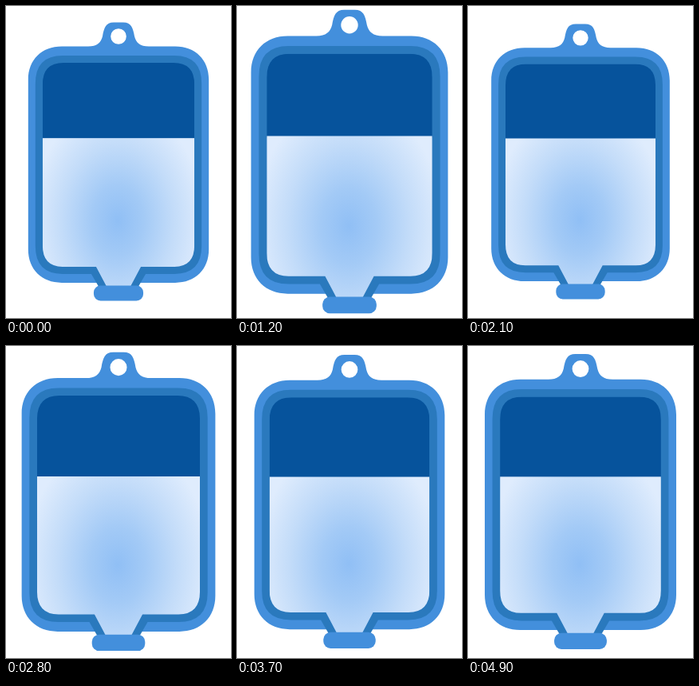
Animation, 282 px wide and 390 px high, one loop 5 s. Source, as an HTML page:

```html
<!DOCTYPE html>
<html lang="en">
<head>
<meta charset="utf-8">
<title>Pulsing fluid bag</title>
<style>
  html, body { margin: 0; width: 100%; height: 100%; overflow: hidden; background: #fff; }
  svg { display: block; width: 100vw; height: 100vh; }
</style>
</head>
<body>
<svg viewBox="0 0 282 390">
  <defs>
    <radialGradient id="fluid" gradientUnits="userSpaceOnUse" cx="0" cy="0" r="1"
      gradientTransform="translate(140 268) scale(108 146)">
      <stop offset="0" stop-color="#90bff5"/>
      <stop offset=".3" stop-color="#a3caf6"/>
      <stop offset=".65" stop-color="#c3dcf9"/>
      <stop offset="1" stop-color="#dfecfd"/>
    </radialGradient>
    <clipPath id="inside">
      <path d="M72 71H210Q236 71 236 98V299Q236 325.500 211 325.500H169L156 350H126L113 325.500H71Q46 325.500 46 299V98Q46 71 72 71Z"/>
    </clipPath>
  </defs>
  <g id="bag">
    <path fill="#438fdc" fill-rule="evenodd" d="M70 50.500H103C114 50.500 119 46 121 38C123 27 125 20.500 135 20.500H147C157 20.500 159 27 161 38C163 46 168 50.500 179 50.500H212C237 50.500 254 67 254 92V304C254 329 237 345.500 212 345.500H70C45 345.500 28 329 28 304V92C28 67 45 50.500 70 50.500ZM150.800 38a9.800 9.800 0 1 0-19.600 0a9.800 9.800 0 1 0 19.600 0Z"/>
    <path fill="#2a79bd" d="M71 62H211Q245 62 245 97V300Q245 334.500 211 334.500H175L166 350H116L107 334.500H71Q37 334.500 37 300V97Q37 62 71 62Z"/>
    <g clip-path="url(#inside)">
      <rect x="40" y="65" width="202" height="102" fill="#06539c"/>
      <rect x="40" y="165" width="202" height="190" fill="url(#fluid)"/>
    </g>
    <rect x="110" y="349" width="62" height="19" rx="8.500" fill="#438fdc"/>
  </g>
</svg>
<script>
  const LOOP = 5000, STEP = 100;
  const HALF = 1100, PEAK = 975;      // half a pulse, time of the first peak
  const MAX = 389.5, MIN = 343.3;     // bag height at the extremes
  const BASE = 348;                   // height as drawn
  const bag = document.getElementById('bag');

  // Linear swell and shrink
  function heightAt(t) {
    const p = Math.abs(t - PEAK) % (2 * HALF);
    const away = Math.min(p, 2 * HALF - p) / HALF;
    return MAX - (MAX - MIN) * away;
  }

  function draw() {
    const t = Math.floor(performance.now() % LOOP / STEP) * STEP;
    const s = heightAt(t) / BASE;
    bag.setAttribute('transform', `translate(141 194.5) scale(${s}) translate(-141 -194.3)`);
    requestAnimationFrame(draw);
  }
  draw();
</script>
</body>
</html>
```
